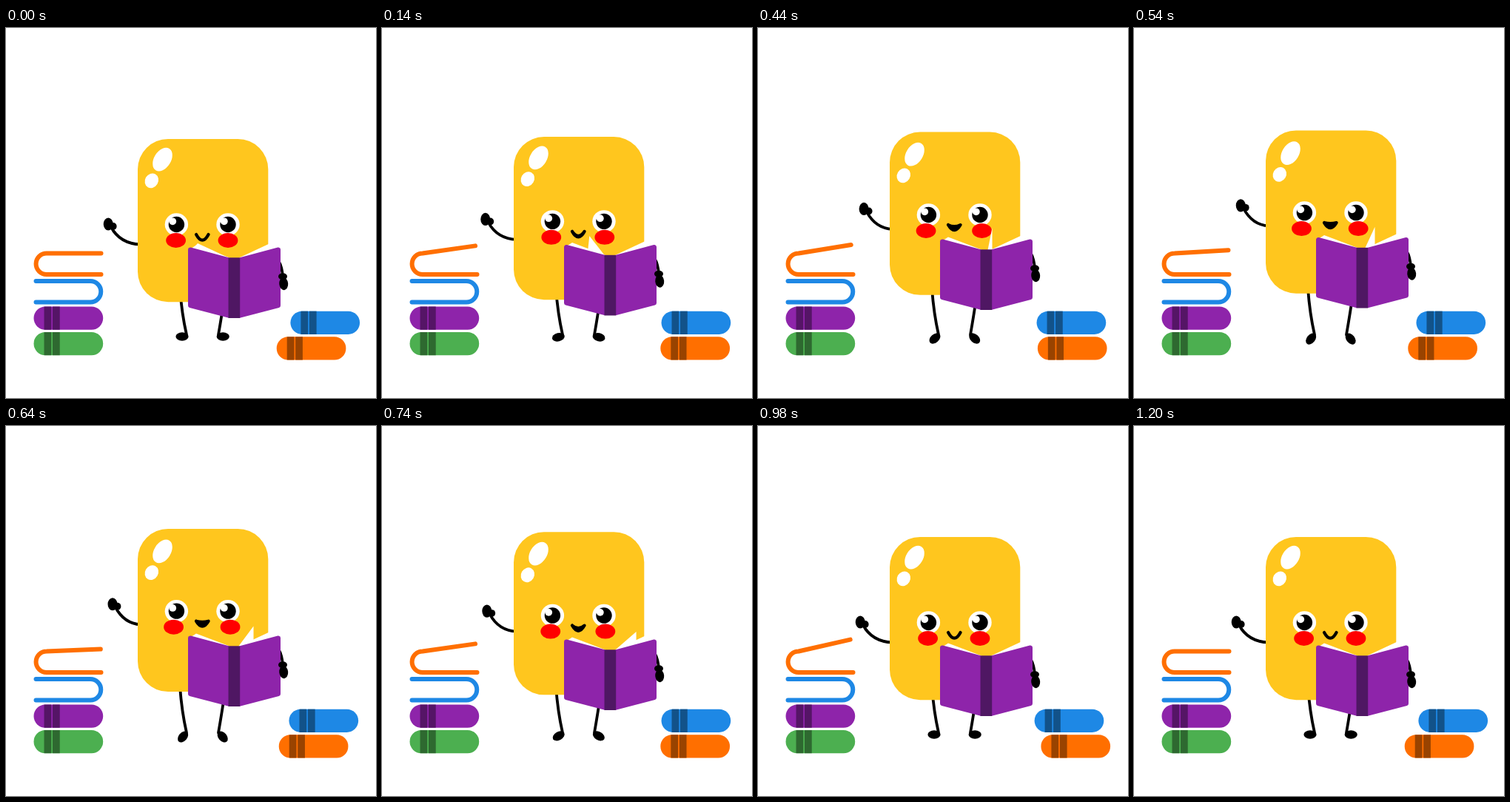
An HTML page with a canvas for the animation above (1.8 s loop, 500 px wide and 500 px high).

```html
<!DOCTYPE html>
<html lang="en">
<head>
<meta charset="utf-8">
<title>Reading character</title>
<style>
  html, body { margin: 0; width: 100%; height: 100%; overflow: hidden; background: #fff; }
  canvas { display: block; width: 100vw; height: 100vh; }
</style>
</head>
<body>
<canvas id="stage" width="500" height="500"></canvas>
<script>
const ctx = document.getElementById('stage').getContext('2d');
const LOOP = 1800, STEP = 20;
const YELLOW = '#ffc61e', PURPLE = '#8e24aa', BLUE = '#1e88e5', ORANGE = '#ff6f00', GREEN = '#4caf50';

// Linear interpolation through [time, value, value, ...] keys.
function track(t, keys) {
  const i = Math.max(1, keys.findIndex(k => k[0] >= t));
  const a = keys[i - 1], b = keys[i];
  const k = (t - a[0]) / (b[0] - a[0]);
  return a.slice(1).map((v, j) => v + (b[j + 1] - v) * k);
}

function ellipse(x, y, rx, ry, color, degrees = 0) {
  ctx.fillStyle = color;
  ctx.beginPath();
  ctx.ellipse(x, y, rx, ry, degrees * Math.PI / 180, 0, Math.PI * 2);
  ctx.fill();
}

function polygon(points, color) {
  ctx.fillStyle = color;
  ctx.beginPath();
  points.forEach(([x, y]) => ctx.lineTo(x, y));
  ctx.closePath();
  ctx.fill();
}

function roundRect(x, y, w, h, r, color) {
  ctx.fillStyle = color;
  ctx.beginPath();
  ctx.roundRect(x, y, w, h, r);
  ctx.fill();
}

function limb(x0, y0, cx, cy, x1, y1) {
  ctx.strokeStyle = '#000';
  ctx.lineWidth = 3.8;
  ctx.beginPath();
  ctx.moveTo(x0, y0);
  ctx.quadraticCurveTo(cx, cy, x1, y1);
  ctx.stroke();
}

function shifted(dy, draw) {
  ctx.save();
  ctx.translate(0, dy);
  draw();
  ctx.restore();
}

function closedBook(x, y, color, band) {
  roundRect(x, y, 93.7, 31.2, 15.6, color);
  ctx.fillStyle = band;
  ctx.fillRect(x + 14, y, 9.7, 31.2);
  ctx.fillRect(x + 25.5, y, 9.7, 31.2);
}

function openBooks(lift) {
  ctx.lineWidth = 6;
  ctx.strokeStyle = BLUE;
  ctx.beginPath();
  ctx.moveTo(40.5, 342);
  ctx.lineTo(114, 342);
  ctx.arc(114, 356.25, 14.25, -Math.PI / 2, Math.PI / 2);
  ctx.lineTo(40.5, 370.5);
  ctx.stroke();

  ctx.strokeStyle = ORANGE;
  ctx.beginPath();
  ctx.moveTo(128.5 - 5.2 * lift, 304.5 - 21.7 * lift);
  ctx.lineTo(54.8, 304.5);
  ctx.arc(54.8, 318.75, 14.25, -Math.PI / 2, Math.PI / 2, true);
  ctx.lineTo(128.5, 333);
  ctx.stroke();
}

function mouth(k) {
  const y = 279 - 17.7 * k;
  ctx.fillStyle = ctx.strokeStyle = '#000';
  ctx.lineWidth = 4.2;
  ctx.beginPath();
  ctx.moveTo(257, y);
  ctx.quadraticCurveTo(265.3, y + 15.4 - 1.5 * k, 273.6, y);
  ctx.quadraticCurveTo(265.3, y + 15.4 - 15 * k, 257, y);
  ctx.fill();
  ctx.stroke();
}

function face(k) {
  const dy = -17.7 * k;
  for (const x of [230.4, 300]) {
    ellipse(x, 265.5 + dy, 15.7, 15.2, '#fff');
    ellipse(x, 265.5 + dy, 10.7, 10.7, '#000');
    ellipse(x - 5.2, 261.3 + dy, 4.9, 4.9, '#fff');
  }
  ellipse(229.6 - 3.5 * k, 287 + dy, 13.4, 10, '#f00');
  ellipse(300 + 3.5 * k, 287 + dy, 13.4, 10, '#f00');
  mouth(k);
}

function pages(t) {
  polygon([[250, 298], [257, 293.5], [302, 310.5], [302, 320], [252, 306]], '#fff');
  polygon([[315, 310.5], [359, 290], [367, 298], [365, 306], [315, 320]], '#fff');
  if (t >= 900) return;
  const [spine, tipX, tipY, edgeX, edgeY] = track(t, [
    [0, 302, 259, 291, 251, 300],
    [300, 300, 304.6, 277, 309, 312],
    [440, 310.5, 316.5, 281, 316.5, 312],
    [640, 314, 334.5, 283.5, 334.5, 309],
    [900, 316, 358, 290, 358, 304]
  ]);
  polygon([[spine, 311], [tipX, tipY], [edgeX, edgeY]], '#fff');
}

// Outer corners are rounded, the spine side is straight.
function cover(outer, inner) {
  ctx.fillStyle = PURPLE;
  ctx.beginPath();
  ctx.moveTo(inner, 310.3);
  ctx.arcTo(outer, 295.6, outer, 340, 3);
  ctx.arcTo(outer, 377.3, inner, 391.8, 3);
  ctx.lineTo(inner, 391.8);
  ctx.fill();
}

function heldBook(t) {
  pages(t);
  limb(369, 316, 373, 323, 374, 336);
  cover(246, 301);
  cover(371, 316);
  ctx.fillStyle = '#4f1763';
  ctx.fillRect(300.5, 310.3, 15.7, 81.7);
  ellipse(374, 335.8, 6, 4.6, '#000');
  ellipse(375.2, 345.6, 6, 8.6, '#000', -5);
}

function character(t, k) {
  const armY = -28 * k, handX = 6.7 * k;
  limb(142 + handX, 269 + armY, 154 + handX, 291.5 + armY, 182, 292.5 + armY);
  ellipse(138.2 + handX, 265 + armY, 6.5, 8.6, '#000');
  ellipse(144.9 + handX, 268 + armY, 4.7, 4.9, '#000');

  limb(235, 352, 237.5, 386, 244, 414.5);
  limb(297, 352, 291.5, 389, 287, 414.5);
  ellipse(238 + 1.3 * k, 417 + 3.4 * k, 8.6, 5.7, '#000', -57 * k);
  ellipse(293.2 - 0.6 * k, 417 + 3.4 * k, 8.6, 5.7, '#000', 57 * k);

  roundRect(178, 150 - 12.8 * k, 176.3, 220.2, 41, YELLOW);
  shifted(-9.4 * k, () => {
    ellipse(211.5, 177.6, 11.3, 17.3, '#fff', 32);
    ellipse(196.8, 206.3, 8.9, 10.2, '#fff', 30);
  });
  face(k);
  shifted(-15 * k, () => heldBook(t));
}

function render(t) {
  const rise = Math.max(0, t < 600 ? t / 600 : (900 - t) / 300);
  const sway = t < 1200 ? 1 - Math.abs(t % 600 / 300 - 1) : 0;
  ctx.fillStyle = '#fff';
  ctx.fillRect(0, 0, 500, 500);
  ctx.lineCap = ctx.lineJoin = 'round';

  openBooks(sway);
  closedBook(37.5, 376.5, PURPLE, '#551566');
  closedBook(37.5, 411, GREEN, '#2e6930');
  closedBook(384.4 - 14.7 * sway, 382.7, BLUE, '#125289');
  closedBook(365.7 + 22.8 * sway, 417.3, ORANGE, '#994300');
  character(t, rise);
}

const start = performance.now();
function tick() {
  const t = (performance.now() - start) % LOOP;
  render(Math.floor(t / STEP) * STEP);
  requestAnimationFrame(tick);
}
tick();
</script>
</body>
</html>
```
